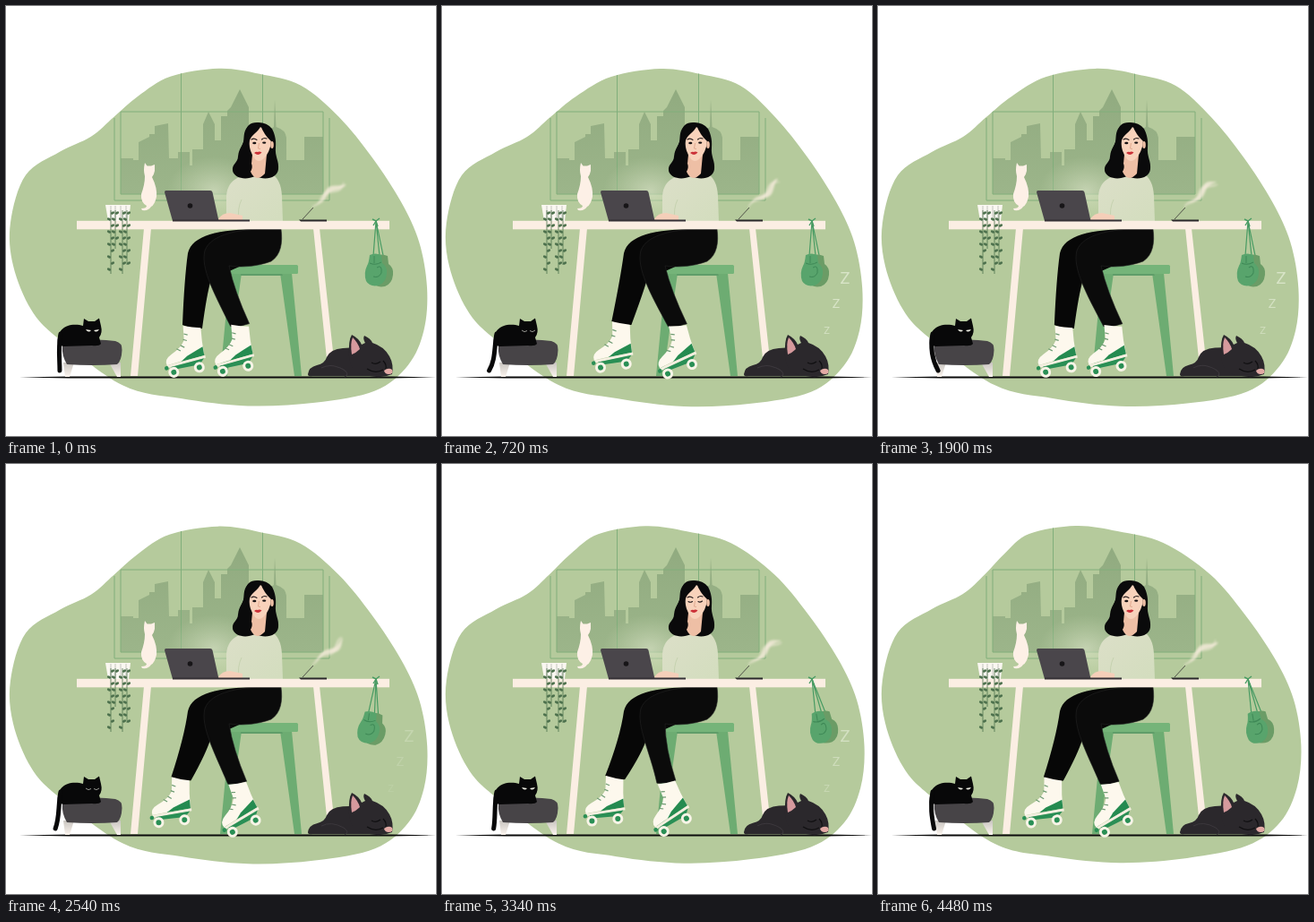
An HTML page that plays this animation: 480 px wide and 480 px high, repeating every 4.5 s.

```html
<!DOCTYPE html>
<html lang="en">
<head>
<meta charset="utf-8">
<title>Desk scene</title>
<style>
  html, body { margin: 0; width: 100%; height: 100%; overflow: hidden; background: #fff; }
  svg { display: block; width: 100vw; height: 100vh; }
  text { font-family: Lato, "Open Sans", sans-serif; fill: #dce7cc; text-anchor: middle; }
</style>
</head>
<body>
<svg viewBox="0 0 480 480">
  <defs>
    <clipPath id="clip"><path id="clipBlob"/></clipPath>
    <filter id="soft" x="-30%" y="-30%" width="160%" height="160%"><feGaussianBlur stdDeviation="1"/></filter>
    <radialGradient id="glow">
      <stop offset="0" stop-color="#dfe6cc" stop-opacity=".6"/>
      <stop offset="1" stop-color="#cfdcb8" stop-opacity="0"/>
    </radialGradient>
    <linearGradient id="city" x1="0" y1="0" x2="0" y2="1">
      <stop offset="0" stop-color="#91ab80"/>
      <stop offset="1" stop-color="#9cb58a"/>
    </linearGradient>
    <linearGradient id="knit" x1="0" y1="0" x2="1" y2="1">
      <stop offset="0" stop-color="#dcdfc8"/>
      <stop offset="1" stop-color="#d3ddbe"/>
    </linearGradient>
    <linearGradient id="legShade" x1="0" y1="0" x2="0" y2="1">
      <stop offset="0" stop-color="#c9c5c0"/>
      <stop offset="1" stop-color="#fbf4ee"/>
    </linearGradient>
    <g id="skate">
      <path d="M-10-3Q0 1 9 3Q7 18 7 33L-36 37Q-38 30-29 26Q-17 21-12 13Z" fill="#fdf8ed"/>
      <path d="M-11 6l4 2M-13 12l4 2M-17 18l4 3M-22 21l4 3" stroke="#6e9b73" stroke-width="1.2"/>
      <path d="M-12 31Q-4 28 7 24V34L-20 36Z" fill="#258b50"/>
      <path d="M-36 37L8 34V37L-35 40Z" fill="#f4efe0"/>
      <path d="M-32 39.500L6 37L0 43H-30Z" fill="#2a8f55"/>
      <circle cx="-37" cy="40" r="2.300" fill="#2a8f55"/>
      <g fill="#f8f4e7"><circle cx="-30" cy="46" r="6"/><circle cx="-1" cy="46" r="6"/></g>
      <g fill="#2a8f55"><circle cx="-30" cy="46" r="3"/><circle cx="-1" cy="46" r="3"/></g>
    </g>
    <path id="glove" d="M406 278Q412 275 419 278L420 287Q426 291 425 299Q424 309 416 312Q406 314 402 307Q399 298 403 290Q405 287 406 278Z"/>
  </defs>

  <path id="blob" fill="#b5ca9c"/>

  <g clip-path="url(#clip)">
    <path fill="url(#city)" d="M128 210V170H142V172H148V152L160 146V143H166V134L181 131L182 170H192V163H205V178H208V160H220V132L226 118L233 132V150H240V123H247V117L251 113L261 93L271 113V140H294Q296 136 299 135L300 104L301.500 135Q312 138 313 147V172H333V146H354V210Z"/>
    <g fill="none" stroke="#80ae7b" stroke-width="1">
      <path d="M128 118H354V210H128ZM121 125V217H361V125"/>
      <path d="M195.500 70V210M286.500 70V210"/>
    </g>
  </g>

  <path d="M15 414.500L70 413.500H430L480 414.500L430 415.500H70Z" fill="#0c0c0c"/>

  <!-- chair -->
  <g fill="#6dac72">
    <path d="M250 298H263L247 413H239ZM306 298H319L330 413H322Z"/>
    <rect x="247" y="289" width="79" height="10" rx="1.500" fill="#75b479"/>
    <path d="M262 299H308L309 301H262Z" fill="#5f9d69"/>
  </g>

  <!-- desk legs -->
  <path d="M154 248H162L147 413H139ZM343 248H350L368 413H360Z" fill="#fbeee3"/>

  <ellipse cx="232" cy="206" rx="52" ry="38" fill="url(#glow)"/>

  <!-- legs -->
  <path id="farLeg" fill="#070707"/>
  <use id="farSkate" href="#skate"/>
  <path id="nearLeg" fill="#0b0b0b" stroke="#242424" stroke-width=".6"/>
  <use id="nearSkate" href="#skate"/>

  <!-- woman -->
  <path d="M246 241V212Q247 196 262 190L296 187Q307 193 308 212L309 241Z" fill="url(#knit)"/>
  <path d="M282 130Q268 129 267 143C267 154 260 157 259 168C259 175 252 176 253 184C255 192 267 195 278 190C290 195 303 192 304 182C305 173 300 168 301 158C302 148 299 141 297 137Q291 130 282 130Z" fill="#0a0a0b"/>
  <path d="M275 166L273 185Q279 198 289 187L291 166Z" fill="#eebfa5"/>
  <path d="M271 148Q271 136 283 135Q295 137 296 150Q295 164 287 171Q282 175 278 171Q271 162 271 148Z" fill="#f8d2bb"/>
  <ellipse cx="297" cy="155" rx="1.800" ry="4" fill="#eebfa5"/>
  <path d="M285 133C281 142 274 143 272 150C270 159 275 167 274 176C277 183 270 191 261 191C253 189 253 181 257 177C262 172 258 165 263 157C267 150 264 144 268 137Q275 129 285 133Z" fill="#0a0a0b"/>
  <path d="M284 133Q288 144 296 151Q300 143 295 136Q290 130 284 133Z" fill="#0a0a0b"/>
  <g fill="none" stroke="#21191a" stroke-width="1.100" stroke-linecap="round">
    <path d="M274 149Q277 147 280 149.500M285.500 149Q288 146.500 291 148"/>
    <path id="lids" d="M275 153.500Q277 155 279.500 153.500M286 153.500Q288 155 290.500 153"/>
  </g>
  <g id="eyes" fill="#191415">
    <ellipse cx="277.300" cy="153" rx="2.100" ry="1.200"/><ellipse cx="288.200" cy="152.600" rx="2.100" ry="1.200"/>
  </g>
  <path d="M282.500 153L281.500 159L284 159.500" fill="none" stroke="#dea58c" stroke-width=".9"/>
  <path d="M277 164Q279.500 162 281 163Q283 162 285.500 163.500Q282 168 277 164Z" fill="#cb3038"/>
  <path d="M263 216Q258 226 260 239" fill="none" stroke="#c1ceaa" stroke-width=".8"/>
  <path d="M237 238Q241 231 250 231L264 234V240H238Z" fill="#f5cfb9"/>

  <!-- laptop, incense, desk top -->
  <path d="M178.500 206H228Q230 206 230.500 208L237.500 240H186L177 208Q177 206 178.500 206Z" fill="#4a464b"/>
  <circle cx="205.500" cy="223" r="2.800" fill="#171518"/>
  <rect x="79" y="239.800" width="349" height="9.500" fill="#fbeee3"/>
  <path d="M186 238.500H272V240.500H186Z" fill="#353136"/>
  <path d="M327 238.500H358V240.500H329Z" fill="#29272a"/>
  <path d="M331 238L343 225" stroke="#45433f" stroke-width=".9"/>
  <g filter="url(#soft)" fill="#f4ecda">
    <path id="smokeA" opacity=".8"/><path id="smokeB" opacity=".55"/>
  </g>

  <!-- white cat -->
  <path d="M155 175L157.500 178.500H162L166 177L166 184Q165 189 163 191Q169 203 168 213Q166 222 162 224Q159 229 152 228L151 226Q157 226 157 223Q150 219 151 210Q155 199 155 190Q153 183 155 175Z" fill="#fdf0e6"/>

  <!-- plant -->
  <path d="M111 222H139L137 240H114Z" fill="#faf7f1"/>
  <path d="M117 223V239M122 223V239M128 223V239M134 223V239" stroke="#d6d6cf" stroke-width="1.500"/>
  <g id="vines" fill="#4d714d" stroke="#4d714d" stroke-width=".8"></g>

  <!-- ottoman and black cat -->
  <path d="M64 398H76L71 414H66ZM115 398H128V414H124Z" fill="url(#legShade)"/>
  <path d="M66 376Q97 370 122 374Q130 376 129.500 384Q129 396 124 400Q97 402 68 400Q62 390 63 380Z" fill="#474447"/>
  <path d="M58 378C56 362 66 354 82 356L86 357L87 349L92 352H99L104 348.500L106 357Q108 365 104 370L106 377Q104 380 96 379L64 380Z" fill="#080809"/>
  <path id="tail" fill="none" stroke="#080809" stroke-width="5" stroke-linecap="round"/>
  <path id="catEyes" d="M89 361L95 362Q92 365.500 89 361ZM98 362L104 361Q101 365.500 98 362Z" fill="#eeeee4"/>
  <path id="catLids" d="M89 362Q92 365 95 362.500M98 362.500Q101 365 104 362" fill="none" stroke="#bcbdb5" stroke-width=".8"/>

  <!-- gloves -->
  <g id="gloves">
    <path d="M413 240L410 279M413 240L417 279M413 240L422 283" fill="none" stroke="#489b63" stroke-width="1.200"/>
    <use href="#glove" x="7" y="1" fill="#6b9c66"/>
    <use href="#glove" fill="#58a46c"/>
    <path d="M406 287Q412 290 419 286M414 292Q420 288 419 298Q416 304 410 302M411 279V287" fill="none" stroke="#3e8856" stroke-width="1"/>
  </g>
  <path d="M409 238L413 240L417 237M413 240L410 245M413 240L415 246" fill="none" stroke="#489b63" stroke-width="1.400"/>

  <!-- dog -->
  <g id="dog">
    <path d="M337 411Q338 403 347 401Q356 399 358 392Q362 383 376 382Q394 380 407 387Q420 395 421 413H342Q337 414 337 411Z" fill="#2b282c"/>
    <path d="M352 404Q363 398 377 406Q384 411 378 414" fill="none" stroke="#3c383d" stroke-width="1"/>
  </g>
  <path d="M383 391Q382 373 386 367Q394 371 397 378L401 376Q398 371 400 368Q407 371 409 376Q422 380 428 391Q433 400 431 411Q420 416 406 413Q385 413 383 391Z" fill="#2b282c"/>
  <path d="M386 389Q384 377 387 370Q393 376 395 383Q391 387 386 389Z" fill="#d69a9d"/>
  <path d="M408 398Q413 401 418 397M403 405Q412 411 421 406M421 396Q425 400 424 405" fill="none" stroke="#100f11" stroke-width="1.200"/>
  <path d="M422 407Q427 403 431 406Q433 411 427 411Q423 411 422 407Z" fill="#e3aaa5"/>

  <g id="zs">
    <text x="450" y="310" font-size="18">Z</text>
    <text x="440" y="337" font-size="14">Z</text>
    <text x="429.500" y="366" font-size="11">Z</text>
  </g>
</svg>
<script>
const LOOP = 4500, STEP = 965;
const $ = id => document.getElementById(id);
const set = (id, name, value) => $(id).setAttribute(name, value);
const clamp = x => Math.max(0, Math.min(1, x));
// Cosine wave that peaks at time `peak`.
const wave = (t, period, peak = 0) => Math.cos((t - peak) / period * Math.PI * 2);

const OUTLINE = [[245,70], [290,76], [334,89], [372,124], [408,169], [440,219], [460,264], [469,315], [466,362],
  [449,401], [412,431], [345,444], [270,447], [195,438], [130,423], [58,371], [28,339], [8,290], [5,242],
  [22,189], [60,163], [95,146], [121,124], [150,101], [190,79]];

// The crown drifts left, the right side swells and the base tilts.
function drift([x, y], k) {
  const crown = Math.exp(-(((y - 65) / 35) ** 2));
  const side = Math.sin(clamp((y - 130) / 270) * Math.PI) * clamp((x - 240) / 200);
  const base = clamp((y - 400) / 40) * (240 - x) / 240;
  return [x + k * (4 * side - 25 * crown), y + k * (7 * base - 1)];
}

function blobPath(k) {
  const pts = OUTLINE.map(p => drift(p, k)), n = pts.length;
  const at = i => pts[(i + n) % n];
  let d = "M" + at(0);
  for (let i = 0; i < n; i++) {
    const [p, q, r, s] = [at(i - 1), at(i), at(i + 1), at(i + 2)];
    const c1 = q.map((v, j) => v + (r[j] - p[j]) / 6);
    const c2 = r.map((v, j) => v - (s[j] - q[j]) / 6);
    d += `C${c1} ${c2} ${r}`;
  }
  return d + "Z";
}

function smokePath(t, phase, width) {
  const left = [], right = [];
  for (let i = 0; i <= 16; i++) {
    const s = i / 16;
    const off = 4 * Math.sqrt(s) * Math.sin(Math.PI * 2 * (1.3 * s - t / 1500) + phase);
    const w = .4 + width * Math.sin(Math.PI * s) * s;
    const x = 342 + 35 * s, y = 224 - 28 * s;
    left.push([x + .62 * (off + w), y + .78 * (off + w)]);
    right.unshift([x + .62 * (off - w), y + .78 * (off - w)]);
  }
  return "M" + left.concat(right).join("L") + "Z";
}

function growVines() {
  let out = "";
  for (const [x, end] of [[117, 299], [122, 271], [130, 299], [135, 289]]) {
    out += `<path d="M${x} 228V${end}" fill="none"/>`;
    for (let y = 231, side = 1; y <= end; y += 7, side = -side) {
      const cx = x + side * 2;
      out += `<ellipse cx="${cx}" cy="${y}" rx="2.300" ry="1.400" stroke="none" transform="rotate(${side * -28} ${cx} ${y})"/>`;
    }
  }
  $("vines").innerHTML = out;
}

function drawLegs(t) {
  const kick = wave(t, STEP), trail = wave(t, STEP, .85 * STEP);
  const fx = 200.5 + 7.5 * kick, fy = 354 + 4 * kick;
  const nx = 257 + 8 * trail, ny = 356 + trail;
  set("farLeg", "d", `M285 249C236 249 208 256 203 276Q199 305 ${fx - 11} ${fy - 2}Q${fx} ${fy + 3} ${fx + 11} ${fy + 2}Q224 322 229 305L285 280Z`);
  set("nearLeg", "d", `M307 249C309 264 307 278 296 285C280 291 262 292 249 290Q${nx / 2 + 124} 318 ${nx + 10} ${ny - 2}Q${nx} ${ny + 2} ${nx - 11} ${ny + 1}C232 320 217 293 222 273C229 254 262 249 290 249Z`);
  set("farSkate", "transform", `translate(${fx} ${fy}) rotate(${-8 - 3 * kick})`);
  set("nearSkate", "transform", `translate(${nx} ${ny}) rotate(${9 * kick - 21})`);
}

const near = (t, times) => times.some(b => Math.abs(t - b) < 100);
function blink(eyes, lids, shut) {
  set(eyes, "opacity", shut ? 0 : 1);
  set(lids, "opacity", shut ? 1 : 0);
}

function draw(t) {
  const shape = blobPath((1 - wave(t, 6500, 1220)) / 2);
  set("blob", "d", shape);
  set("clipBlob", "d", shape);
  drawLegs(t);
  set("smokeA", "d", smokePath(t, 0, 4));
  set("smokeB", "d", smokePath(t, 1.2, 3));

  const tail = 60 + 8 * wave(t, 2300, 1725);
  set("tail", "d", `M61 366C58 382 60 394 ${tail} 407`);
  const swing = -10 * clamp((t - 1900) / 500) * wave(t, 570, 3340);
  set("gloves", "transform", `rotate(${swing} 413 240)`);
  blink("eyes", "lids", near(t, [3340]));
  blink("catEyes", "catLids", near(t, [720, 2540]));

  const breath = 1 - .012 * wave(t, 1500, 1125);
  set("dog", "transform", `translate(0 ${414 * (1 - breath)}) scale(1 ${breath})`);

  const u = t % 1500;
  [...$("zs").children].forEach((z, i) => {
    const rise = clamp((u - 60 - i * 50) / 320), fall = clamp((1260 - i * 60 - u) / 480);
    z.setAttribute("opacity", .9 * Math.min(rise, fall));
  });
}

growVines();
const start = performance.now();
function tick() {
  draw((performance.now() - start) % LOOP);
  requestAnimationFrame(tick);
}
tick();
</script>
</body>
</html>
```
